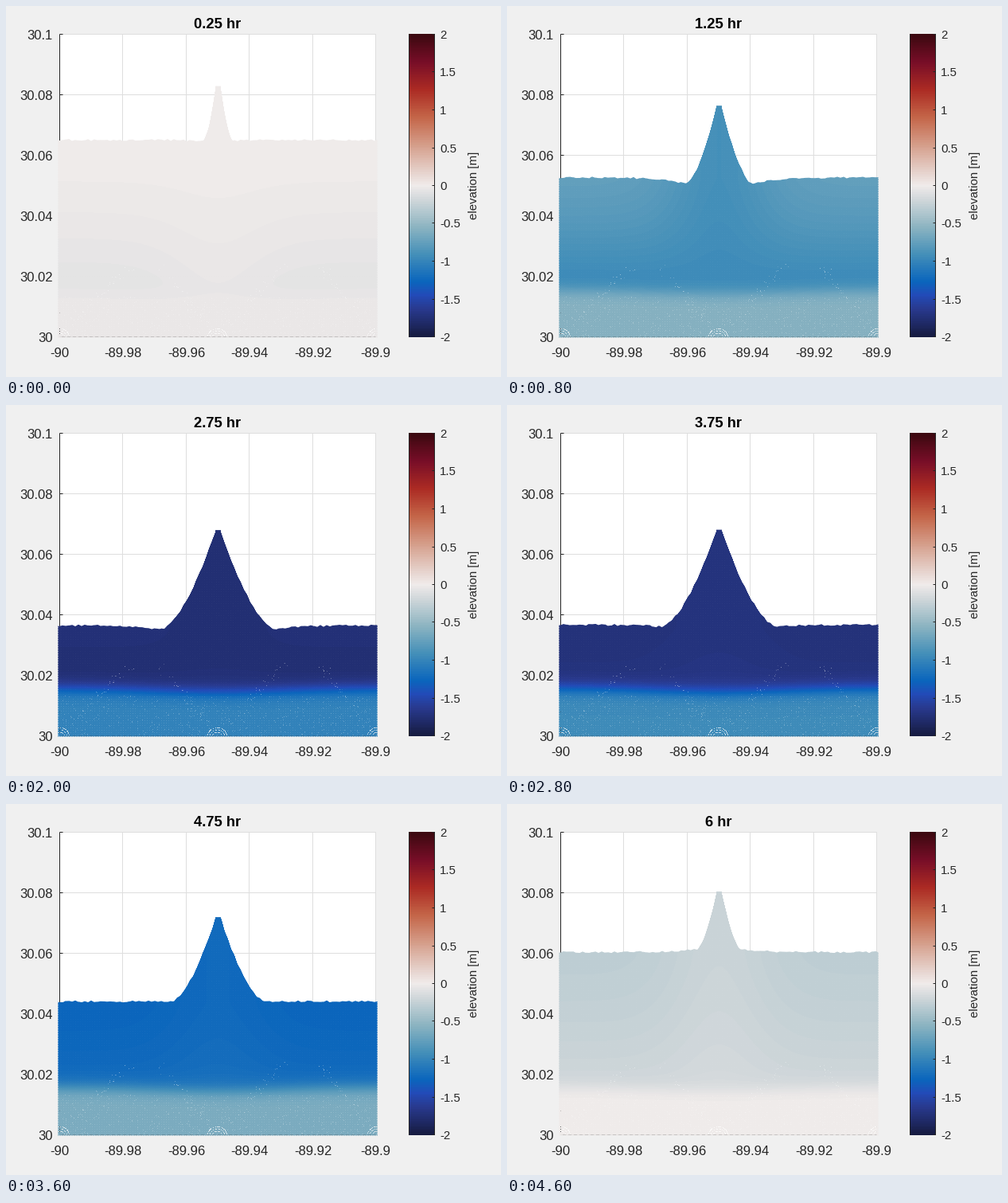
Write a matplotlib script that moves like this. It is 622x466 px and loops after 4.8 s.

```python
import numpy as np
import matplotlib.pyplot as plt
from matplotlib.animation import FuncAnimation
from matplotlib.colors import LinearSegmentedColormap

W, H, DPI = 622, 466, 100
PX = 72 / DPI
N_FRAMES = 24
LEFT, RIGHT, TOP, BOTTOM = 67, 464, 35, 415
CENTER = 266
INK, GRID = "#262626", "#dedede"
plt.rcParams["font.family"] = "Liberation Sans"

# Diverging blue-white-red map, evenly spaced apart from the middle
COLD = ["#171c42", "#293a8f", "#0b66bd", "#4590b9", "#8eb5c2", "#d2d8db"]
WARM = ["#e6d2cc", "#d59d89", "#c46548", "#ac2b24", "#780e28", "#3c0911"]
stops = [(i / 11, c) for i, c in enumerate(COLD + WARM)]
stops += [(1.5 / 11, "#234bb8"), (0.5, "#f1eceb")]
CMAP = LinearSegmentedColormap.from_list("balance", sorted(stops), N=256)

# Pixel grid of the wet area
xs = np.arange(65, 467)
ys = np.arange(96, 417)
X, Y = np.meshgrid(xs, ys)
DIST = np.abs(xs - CENTER)
MIDDLE = np.exp(-(DIST / 70) ** 2)
FRONT = 354 + 5 * np.exp(-(DIST / 110) ** 2)


def make_gaps():
    """Small holes between the markers, fixed in space."""
    rng = np.random.default_rng(4)
    rand = rng.random(X.shape)
    gaps = np.where((X % 3 == 0) & (Y % 3 == 0), 0.16 * rand, 0)
    gaps[Y < 364] *= 0.2
    gaps[(Y > 364) & (rand > 0.985)] = 0.25

    # Loose diagonal seams rising from the bottom, and rings at their ends
    for start, run in ((80, 75), (255, -60), (272, 78), (460, -70)):
        u = rng.random(45)
        px = np.rint(start + run * u + rng.normal(0, 3.5, 45)).astype(int)
        py = np.rint(405 - 80 * u + rng.normal(0, 3.5, 45)).astype(int)
        gaps[py - ys[0], px - xs[0]] = rng.uniform(0.1, 0.45, 45)
    for cx in (LEFT, CENTER - 1, 466):
        radius = np.hypot(X - cx, Y - 417)
        ring = (radius < 13) & (radius > 4) & (np.floor(radius) % 3 == 0)
        gaps[ring & (rand > 0.35)] = 0.7

    gaps[:, [0, -1]] = np.where(ys % 3 == 0, 0.6, 0.3)[:, None]
    gaps[Y == 415] = np.where(xs % 7 < 4, 0.2, 0.05)
    gaps[Y == 416] = np.where(xs % 3 == 0, 0.8, 0.5)
    return gaps


GAPS = make_gaps()


def half_tide(hour, lag=0.0, period=6.2):
    return np.sin(np.pi * (hour - lag) / period)


def water(k):
    """RGBA picture of the wet area for step k."""
    hour = (k + 1) / 4
    spin = np.tanh(1.3 * hour)
    offshore = -1.03 * half_tide(hour, period=6) * spin
    inshore = -1.8 * half_tide(hour) * spin

    # The waterline follows late; spit and dips depend on its drop
    drop = 112 * half_tide(hour, 0.12) * (1 - np.exp(-(hour / 1.07) ** 2.7))
    shore = 167.5 + drop
    tip = 100 + 0.52 * drop
    half = 19 + 0.5 * drop
    foot = shore + (13 - 2.8 * hour) * spin ** 2

    rng = np.random.default_rng(100 + k)
    bumps = np.repeat(rng.uniform(-1.1, 1.1, len(xs) // 4 + 1), 4)[:len(xs)]
    bumps = np.convolve(bumps, np.ones(3) / 3, "same")
    flat = shore + (foot - shore) * np.exp(-np.maximum(DIST - half, 0) / 25)
    u = np.clip((DIST - 3) / (half - 3), 0, 1)
    spit = tip + (foot - tip) * (1 - (1 - u) ** 1.65)
    edge = np.where(DIST < half, spit, flat) + bumps * (DIST > 3)

    depth = np.clip((Y - shore) / (FRONT - shore), 0, 1) ** 1.4
    side = -0.016 * drop
    upper = side + 0.65 * (inshore - side) * MIDDLE * np.tanh(drop / 8)
    lower = inshore - 0.01 + 0.03 * MIDDLE
    inner = upper + (lower - upper) * depth
    z = offshore + (inner - offshore) / (1 + np.exp((Y - FRONT - 1) / 5.5))
    rgba = CMAP((z + 2) / 4)
    rgba[..., 3] = np.clip(Y - edge + 0.5, 0, 1) * (1 - GAPS)
    return rgba


fig = plt.figure(figsize=(W / DPI, H / DPI), dpi=DPI, facecolor="#f0f0f0")
ax = fig.add_axes([0, 0, 1, 1])
ax.axis("off")


def line(x0, y0, x1, y1, color=INK):
    """One-pixel line through pixel centres."""
    ax.plot([x0 + .5, x1 + .5], [y0 + .5, y1 + .5], color=color, lw=PX,
            solid_capstyle="butt", snap=False, zorder=2)


def label(x, y, text, size, ha, **kw):
    return ax.text(x, y, text, fontsize=size, ha=ha, **{"color": INK, **kw})


# Main axes
ax.add_patch(plt.Rectangle((LEFT, TOP), RIGHT - LEFT, BOTTOM - TOP,
                           fc="white", ec="none", zorder=1))
cols = np.rint(np.linspace(LEFT, RIGHT, 6))
rows = np.rint(np.linspace(BOTTOM, TOP, 6))
for c, r in zip(cols, rows):
    line(c, TOP, c, BOTTOM, GRID)
    line(LEFT, r, RIGHT, r, GRID)
line(LEFT, TOP, LEFT, BOTTOM)
line(LEFT, BOTTOM, RIGHT, BOTTOM)
for i, (c, r) in enumerate(zip(cols, rows)):
    line(LEFT, r, LEFT + 4, r)
    label(c + .5, 441, f"{-90 + i * 0.02:g}", 12, "center")
    label(59, r + 7, f"{30 + i * 0.02:g}", 12, "right")

# Colour bar
ax.imshow(np.linspace(1, 0, 256)[:, None], cmap=CMAP, vmin=0, vmax=1,
          extent=(506, 539, BOTTOM + 1, TOP), aspect="auto", zorder=1)
for c in (506, 538):
    line(c, TOP, c, BOTTOM)
for v in np.arange(-2, 2.1, 0.5):
    r = np.rint(225 - v * 95)
    line(535, r, 538, r)
    label(545, r + 6, f"{v:g}", 10.8, "left")
label(588, 225.5, "elevation [m]", 10.8, "center", va="center", rotation=90)

title = label(CENTER, 28, "", 13.2, "center", weight="bold", color="black")
sea = ax.imshow(water(0), extent=(65, 467, 417, 96), aspect="auto",
                interpolation="nearest", zorder=4)
ax.set_xlim(0, W)
ax.set_ylim(H, 0)


def draw(k):
    sea.set_data(water(k))
    title.set_text(f"{(k + 1) / 4:g} hr")
    return sea, title


anim = FuncAnimation(fig, draw, frames=N_FRAMES, interval=200, repeat=True)
plt.show()
```
